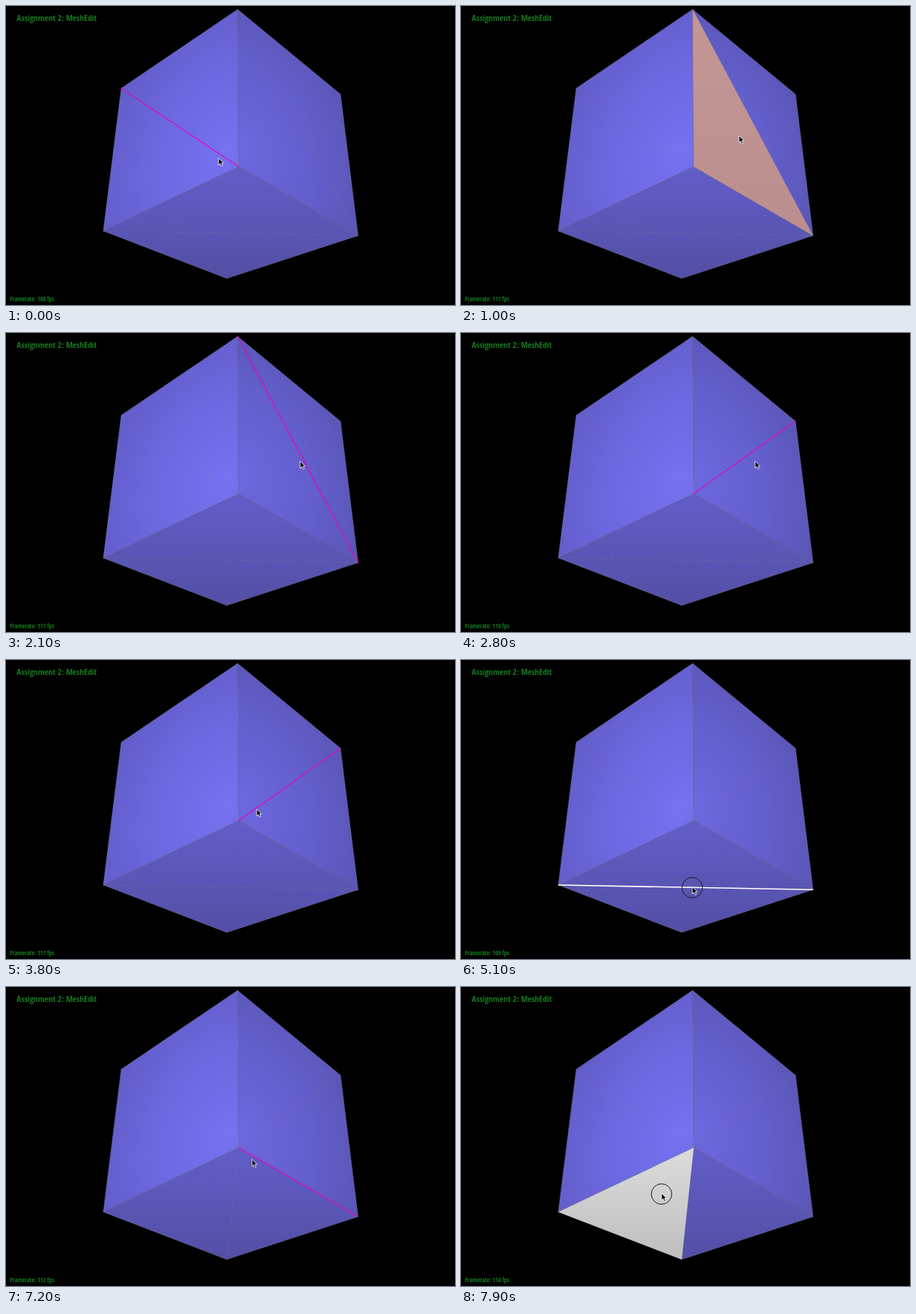
An HTML page for the animation above (8000 ms loop, 600 px wide and 400 px high).

```html
<!DOCTYPE html>
<html lang="en">
<head>
<meta charset="utf-8">
<title>Mesh editor</title>
<style>
html, body { margin: 0; width: 100%; height: 100%; overflow: hidden; background: #000; }
svg { display: block; width: 600px; height: 400px; }
text {
  font-family: "Open Sans Condensed", "Open Sans", sans-serif;
  font-stretch: condensed;
  font-weight: 700;
  fill: #167a1e;
}
.wire { fill: none; stroke: #77758c; stroke-width: .8; stroke-opacity: .5; }
.diagonal { stroke-opacity: .7; stroke-dasharray: 5 3 2 4; }
</style>
</head>
<body>
<svg viewBox="0 0 600 400">
  <defs>
    <radialGradient id="left" gradientUnits="userSpaceOnUse" cx="0" cy="0" r="1"
      gradientTransform="translate(292 196) rotate(25) scale(185 260)">
      <stop offset="0" stop-color="#7672f1"/>
      <stop offset=".5" stop-color="#6b67de"/>
      <stop offset="1" stop-color="#5e5ac2"/>
    </radialGradient>
    <radialGradient id="right" gradientUnits="userSpaceOnUse" cx="0" cy="0" r="1"
      gradientTransform="translate(316 192) rotate(-20) scale(170 240)">
      <stop offset="0" stop-color="#6c68de"/>
      <stop offset=".5" stop-color="#635fcd"/>
      <stop offset="1" stop-color="#5854b0"/>
    </radialGradient>
    <linearGradient id="bottom" gradientUnits="userSpaceOnUse" x1="300" y1="215" x2="300" y2="365">
      <stop offset="0" stop-color="#625ec9"/>
      <stop offset="1" stop-color="#534fa5"/>
    </linearGradient>
    <linearGradient id="hover" gradientUnits="userSpaceOnUse" x1="300" y1="0" x2="300" y2="365">
      <stop offset="0" stop-color="#c49696"/>
      <stop offset="1" stop-color="#b98d8d"/>
    </linearGradient>
    <linearGradient id="picked" gradientUnits="userSpaceOnUse" x1="300" y1="215" x2="300" y2="365">
      <stop offset="0" stop-color="#dcdcdc"/>
      <stop offset="1" stop-color="#bebebe"/>
    </linearGradient>
  </defs>
  <g id="cube"></g>
  <path id="diagonals" class="wire diagonal"/>
  <path id="mark"/>
  <text x="14.3" y="20" font-size="11.4">Assignment 2: MeshEdit</text>
  <text id="fps" x="5.6" y="395" font-size="8"></text>
  <g id="pointer">
    <circle id="ring" cy=".5" r="13.7" fill="none" stroke="#1c1c1c"/>
    <path d="M0-.5V8.8L2.2 6.8L3.7 10.2L5.4 9.5L3.9 6.2H6.7Z" fill="#000" stroke="#fff" stroke-width=".8"/>
  </g>
</svg>
<script>
const LOOP = 8000, STEP = 100, HOLD = 300;
const clicks = [2300, 5000, 7700];
const EDGE_ZONE = .11;

// Corners: top, left, right, centre, lower left (p), lower right (q), base
const corners = {
  t: [309.5, 4.5], l: [154, 110], r: [447, 118], c: [311, 215],
  p: [130, 301], q: [470.5, 307.3], b: [295, 364.5]
};

// Key points: time, then values
const route = [
  [0, 284, 204], [1600, 412, 160], [2100, 393, 172], [2800, 393, 172], [3300, 371, 150],
  [3800, 335, 200], [4600, 309, 304], [5500, 309, 304], [6300, 300, 188],
  [7000, 350, 215], [7600, 268, 276.5], [LOOP, 268, 276.5]
];
const rate = [[0, 108], [1600, 112], [2800, 110], [3800, 111], [6000, 108], [LOOP, 114]];

const $ = id => document.getElementById(id);
const shape = names => 'M' + [...names].map(n => corners[n]).join('L') + (names.length > 2 ? 'Z' : '');

function setAttrs(node, attrs) {
  for (const key in attrs) node.setAttribute(key, attrs[key]);
}

function follow(keys, t) {
  const i = keys.findIndex(k => k[0] > t);
  const [t0, ...from] = keys[i - 1], [t1, ...to] = keys[i];
  const u = (t - t0) / (t1 - t0), ease = u * u * (3 - 2 * u);
  return from.map((v, n) => v + (to[n] - v) * ease);
}

// The first two clicks each flip a diagonal on release.
function meshAt(t) {
  const flipped = n => t >= clicks[n] + HOLD;
  return {
    diagonals: ['lc', flipped(0) ? 'cr' : 'tq', flipped(1) ? 'cb' : 'pq'],
    faces: ['tlc', 'plc',
      ...(flipped(0) ? ['tcr', 'qcr'] : ['ctq', 'rtq']),
      ...(flipped(1) ? ['pcb', 'qcb'] : ['cpq', 'bpq'])]
  };
}

const area = ([ax, ay], [bx, by], [cx, cy]) => (bx - ax) * (cy - ay) - (by - ay) * (cx - ax);

function weights(face, point) {
  const [a, b, c] = [...face].map(n => corners[n]);
  return [area(point, b, c), area(a, point, c), area(a, b, point)].map(v => v / area(a, b, c));
}

// An edge when the point lies close to one, otherwise the whole face.
function pick(faces, point) {
  const face = faces.find(f => weights(f, point).every(w => w > -1e-6));
  const near = weights(face, point).findIndex(w => w < EDGE_ZONE);
  return near < 0 ? face : face.replace(face[near], '');
}

function draw(t) {
  const { diagonals, faces } = meshAt(t);
  const point = follow(route, t);
  const names = pick(faces, point);
  const pressed = clicks.some(c => t >= c && t < c + HOLD);
  const look = names.length > 2
    ? { fill: `url(#${pressed ? 'picked' : 'hover'})`, stroke: 'none' }
    : { fill: 'none', stroke: pressed ? '#fff' : '#e00abc', 'stroke-width': pressed ? 1.6 : 1.3 };
  setAttrs($('diagonals'), { d: diagonals.map(shape).join('') });
  setAttrs($('mark'), { d: shape(names), ...look });
  setAttrs($('pointer'), { transform: `translate(${point})` });
  setAttrs($('ring'), { visibility: pressed ? 'visible' : 'hidden' });
  $('fps').textContent = `Framerate: ${Math.round(follow(rate, t)[0])} fps`;
}

$('cube').innerHTML = [['left', 'tlpc'], ['right', 'tcqr'], ['bottom', 'cpbq']]
  .map(([fill, face]) => `<path d="${shape(face)}" fill="url(#${fill})"/><path class="wire" d="${shape(face)}"/>`)
  .join('');

const start = performance.now();
function tick() {
  const t = (performance.now() - start) % LOOP;
  draw(Math.floor(t / STEP) * STEP);
  requestAnimationFrame(tick);
}
tick();
</script>
</body>
</html>
```
